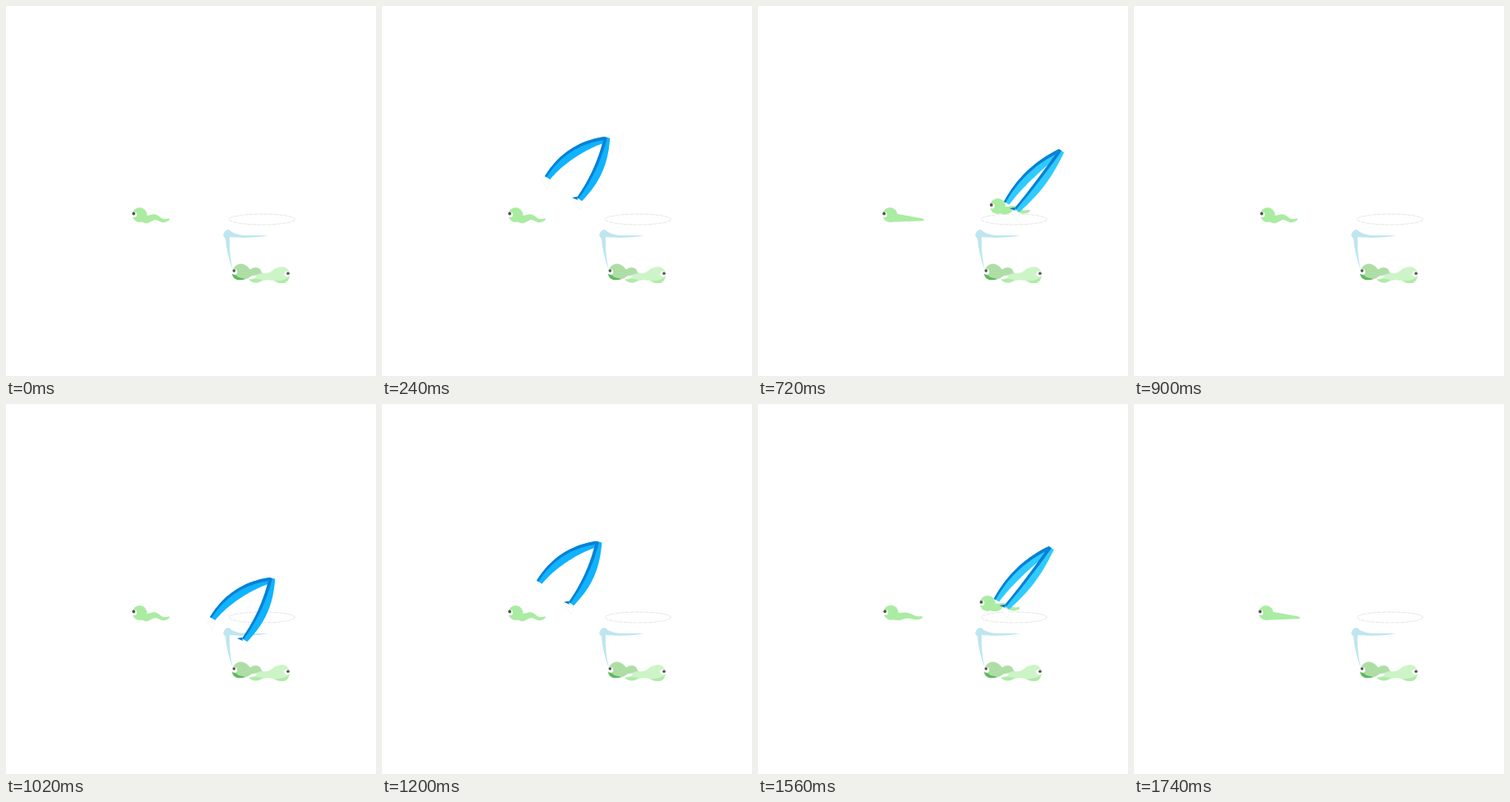
An HTML page that plays this animation: 450 px wide and 450 px high, repeating every 1800 ms.

```html
<!DOCTYPE html>
<html lang="en">
<head>
<meta charset="utf-8">
<title>Tadpoles</title>
<style>
html, body { margin: 0; width: 100%; height: 100%; overflow: hidden; background: #fff; }
svg { display: block; width: 100vw; height: 100vh; }
</style>
</head>
<body>
<svg viewBox="0 0 450 450">
  <g id="jar">
    <ellipse cx="311.5" cy="259.5" rx="40" ry="6.5" fill="none" stroke="#d4d4d4" stroke-width=".6" stroke-dasharray="5 1"/>
    <path fill="#bde6ef" d="M264 279Q266 272 271 272Q277 278 290 279L319 279Q300 283 272 281Q271 300 276 322Q268 300 267 283Z"/>
    <path fill="#aedea6" d="M275 323Q278 313 287 313.500Q293 315 297 320.500Q304 316 309 320L312 326Q306 329 300 328Q294 333 284 333Q276 332 275 323Z"/>
    <path fill="#62b962" d="M275 325Q280 327 283 330L291 332Q287 334 281 333Q275 331 275 325Z"/>
    <path fill="#cdf4c7" d="M295 333Q304 325 313 325Q321 326 326 320Q333 316 340 318Q346 322 345 329Q344 337 336 337Q329 337 325 334Q316 332 310 335Q302 339 295 333Z"/>
    <path fill="#aeeba8" d="M296 333Q304 331 312 333Q303 340 296 333ZM327 334Q337 335 344 330Q342 338 335 337Q330 337 327 334Z"/>
    <path fill="#fff" d="M293 333Q298 327 305 328Q303 332 296 332Z"/>
    <g fill="#fff"><circle cx="278" cy="323.500" r="3.200"/><circle cx="341.500" cy="326" r="3.200"/></g>
    <g fill="#555"><circle cx="277.300" cy="322" r="1.800"/><circle cx="343" cy="325.300" r="1.800"/></g>
  </g>
  <g id="pond"></g>
  <g id="tool"></g>
</svg>
<script>
const PERIOD = 900, STEP = 30, GRAB = 405, ARRIVE = 720;
const pond = document.getElementById('pond');
const tool = document.getElementById('tool');

const span = (t, a, b) => Math.max(0, Math.min(1, (t - a) / (b - a)));
const ease = p => p * p * (3 - 2 * p);
const mix = (a, b, p) => a + (b - a) * p;

// A strip of width w(u) to the right of the point and normal given by at(u)
function strip(at, from, to, fill) {
  const left = [], right = [];
  for (let i = 0; i <= 24; i++) {
    const { x, y, nx, ny, u } = at(i / 24);
    left.push([x + nx * from(u), y + ny * from(u)]);
    right.unshift([x + nx * to(u), y + ny * to(u)]);
  }
  return `<polygon fill="${fill}" points="${left.concat(right).join(' ')}"/>`;
}

// One bowed arm from its tip to the hinge at the origin
function arm(x0, y0, bow, face) {
  const len = Math.hypot(x0, y0);
  const cx = x0 / 2 + y0 / len * -bow, cy = y0 / 2 + x0 / len * bow;
  const at = u => {
    const q = 1 - u;
    const dx = q * (cx - x0) - u * cx, dy = q * (cy - y0) - u * cy, d = Math.hypot(dx, dy);
    return { x: q * q * x0 + 2 * q * u * cx, y: q * q * y0 + 2 * q * u * cy, nx: -dy / d, ny: dx / d, u };
  };
  return `<path fill="#fff" stroke="#e4eef2" stroke-width=".5" d="M${x0} ${y0}l6 9-3 6-7-10z"/>`
    + strip(at, () => 0, u => 7.5 + 4 * Math.sin(Math.PI * u), face)
    + strip(at, () => 0, u => 2.5 + 1.5 * u, '#0a80d4');
}

function tadpole(x, y, r, len, wave, opacity = 1) {
  const at = u => ({
    x: x + u * len,
    y: y + 3 + 3 * u - wave * Math.sin(3.4 * Math.PI * (u - .38)),
    nx: 0, ny: 1, u
  });
  const half = u => 4.5 * (1 - u) + 1.3;
  return `<g opacity="${opacity}"><circle cx="${x}" cy="${y}" r="${r}" fill="#aaeca2"/>
    ${strip(at, u => -half(u), half, '#aaeca2')}
    <circle cx="${x - r + 2.5}" cy="${y - .3}" r="3.200" fill="#fff"/>
    <circle cx="${x - r + 1.8}" cy="${y - 1.5}" r="1.900" fill="#555"/></g>`;
}

// Where the hinge is: fly in, dip to the tadpole, swing over to the jar
function hinge(t) {
  if (t < 240) return [370 - 100 * t / 240, 263 - 104 * t / 240];
  const dip = ease(span(t, 240, GRAB));
  if (t < GRAB) return [mix(270, 237, dip), mix(159, 185, dip)];
  const p = ease(span(t, GRAB, ARRIVE));
  return [mix(237, 366, p), mix(185, 174, p) - 14 * Math.sin(Math.PI * Math.sqrt(p))];
}

function render(t) {
  const held = t >= GRAB;
  const swim = span(t, 510, ARRIVE);
  pond.innerHTML = held
    ? tadpole(mix(164.5, 160.5, swim), mix(253, 254, swim), 9, mix(31, 41, swim), mix(3.5, 0, swim), span(t, GRAB, 480))
    : tadpole(162.5, 254, 9, 36, 1.8);

  const shut = ease(span(t, 300, GRAB));
  const face = `hsl(${mix(199, 195, shut)} 100% ${mix(53, 59, shut)}%)`;
  tool.setAttribute('transform', `translate(${hinge(t)})`);
  tool.setAttribute('opacity', Math.min(span(t, 0, 120), 1 - span(t, ARRIVE, 840)));
  const rx = mix(-33, -54, shut), ry = mix(74, 72, shut);
  tool.innerHTML = arm(mix(-72, -67, shut), mix(48, 64, shut), mix(20, 15, shut), face)
    + (held ? tadpole(-74.5, 69.5, 9.5, 39, 1.5) : '')
    + arm(rx, ry, mix(-8, -2, shut), face)
    + `<path fill="#0a70c4" d="M${rx} ${ry - 1}l-6 1 7 3z"/>`;
}

const start = performance.now();
function frame() {
  const t = (performance.now() - start) % PERIOD;
  render(Math.floor(t / STEP) * STEP);
  requestAnimationFrame(frame);
}
frame();
</script>
</body>
</html>
```
